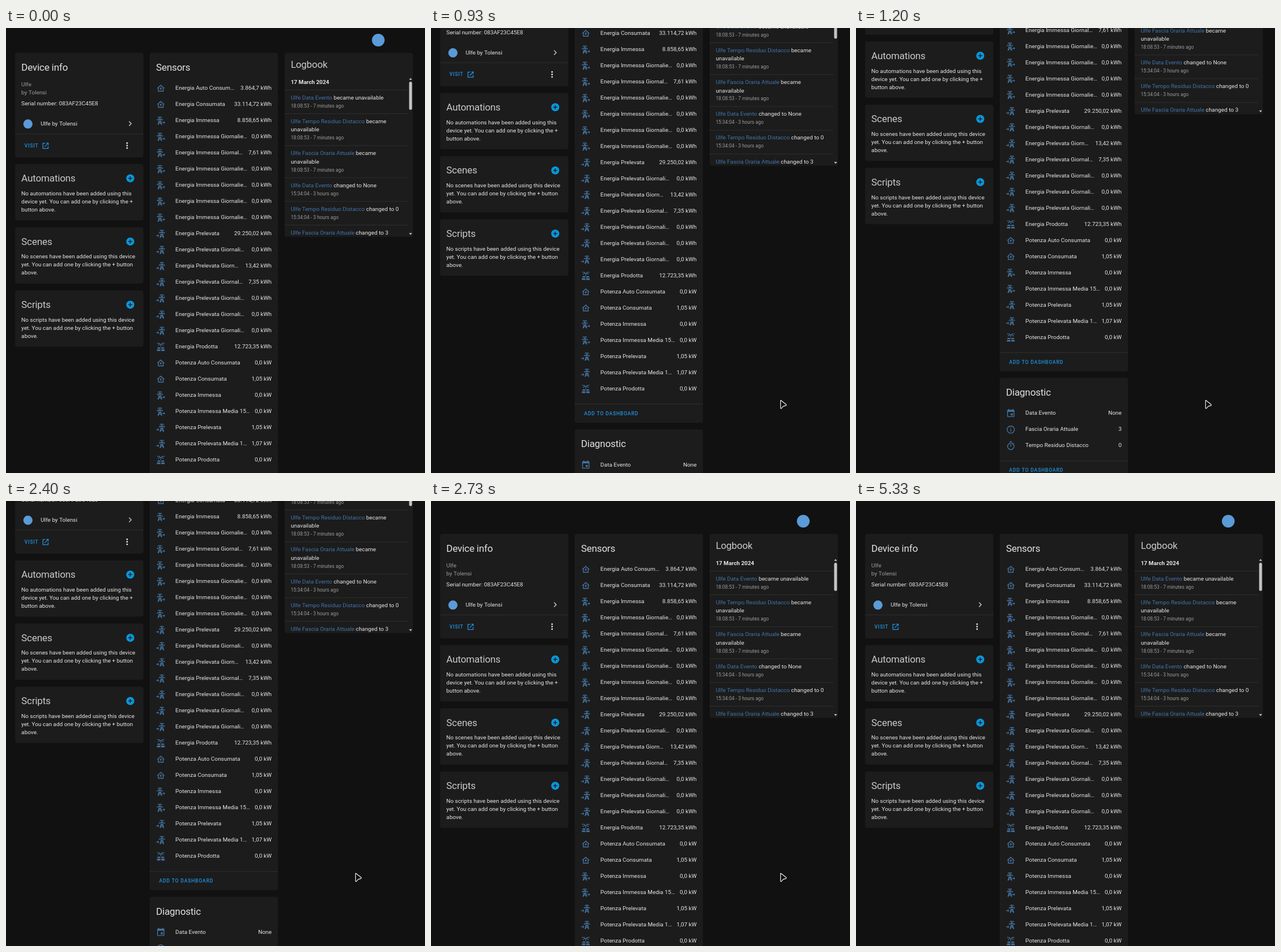
Recreate the animation shown at these times as an HTML page with a canvas. Size 726 by 771 pixels, loop 5740 ms.

```html
<!DOCTYPE html>
<html lang="en">
<head>
<meta charset="utf-8">
<title>Device page</title>
<style>
html, body { margin: 0; width: 100%; height: 100%; overflow: hidden; background: #111; }
canvas { display: block; }
</style>
</head>
<body>
<canvas id="stage" width="726" height="771"></canvas>
<script>
const ctx = document.getElementById('stage').getContext('2d');
const LOOP = 5740, STEP = 200 / 3;
const BODY = '9.8px', ROW = '9.9px';
const C = {
  page: '#111111', card: '#1c1c1c', line: '#333333', text: '#e6e6e6', title: '#e1e1e1',
  soft: '#c9c9c9', dim: '#9b9b9b', icon: '#44739e', link: '#4274aa', action: '#1f93e4',
  add: '#0a96da', brand: '#5a9bd8'
};

const tower = 'M7.4 5 8.4 3H15.6L16.6 5M5 11 6 9H18L19 11M10.7 9 11.5 5.5H12.5L13.3 9' +
  'M10.1 11 7.3 22M13.9 11 16.7 22M10 12.4 15.8 21.2M14 12.4 8.2 21.2';
const shapes = {
  home: new Path2D('M12 3 2 12H5V20H19V12H22ZM12 5.7 17 10.2V18H7V10.2ZM11.3 17V13.6H9L12.7 8V11.4H15Z'),
  solar: new Path2D('M3.3 16H11V13H4ZM13 16H20.7L20 13H13ZM21.1 18H13V22H22ZM2 22H11V18H2.9ZM11 8H13V11H11Z' +
    'M15.8 7.2 17.2 5.8 19.3 7.9 17.9 9.3ZM4.7 7.9 6.8 5.8 8.2 7.2 6.1 9.3ZM3 2H6V4H3ZM18 2H21V4H18Z' +
    'M12 7A5 5 0 0 0 17 2H15A3 3 0 0 1 9 2H7A5 5 0 0 0 12 7Z'),
  calendar: new Path2D('M5 3H6V1H8V3H16V1H18V3H19A2 2 0 0 1 21 5V19A2 2 0 0 1 19 21H5A2 2 0 0 1 3 19V5' +
    'A2 2 0 0 1 5 3ZM5 8V19H19V8ZM12 12H17V17H12Z'),
  info: new Path2D('M21 12A9 9 0 1 1 3 12A9 9 0 1 1 21 12M12 11V17M12 7V9'),
  timer: new Path2D('M20 13.5A8 8 0 1 1 4 13.5A8 8 0 1 1 20 13.5M9 2H15M12 8.5V14.5M18 7.5 19.5 6'),
  tower: new Path2D(tower),
  arrowLine: new Path2D('M0 16.5H4'),
  arrowHead: new Path2D('M4 13 7.5 16.5 4 20Z'),
  cursor: new Path2D('M1 1.5Q.5 .5 1.8 .9L10.6 8Q11.6 9 10.3 9.8L5.8 11 2.6 14.6Q1 15.6 1 14Z')
};

const sensors = [
  ['home', 'Energia Auto Consum…', '3.864,7 kWh'],
  ['home', 'Energia Consumata', '33.114,72 kWh'],
  ['export', 'Energia Immessa', '8.858,65 kWh'],
  ['export', 'Energia Immessa Giornalie…', '0,0 kWh'],
  ['export', 'Energia Immessa Giornal…', '7,61 kWh'],
  ...Array(4).fill(['export', 'Energia Immessa Giornalie…', '0,0 kWh']),
  ['import', 'Energia Prelevata', '29.250,02 kWh'],
  ['import', 'Energia Prelevata Giornali…', '0,0 kWh'],
  ['import', 'Energia Prelevata Giorn…', '13,42 kWh'],
  ['import', 'Energia Prelevata Giornal…', '7,35 kWh'],
  ...Array(3).fill(['import', 'Energia Prelevata Giornali…', '0,0 kWh']),
  ['solar', 'Energia Prodotta', '12.723,35 kWh'],
  ['home', 'Potenza Auto Consumata', '0,0 kW'],
  ['home', 'Potenza Consumata', '1,05 kW'],
  ['export', 'Potenza Immessa', '0,0 kW'],
  ['export', 'Potenza Immessa Media 15…', '0,0 kW'],
  ['import', 'Potenza Prelevata', '1,05 kW'],
  ['import', 'Potenza Prelevata Media 1…', '1,07 kW'],
  ['solar', 'Potenza Prodotta', '0,0 kW']
];
const diagnostics = [
  ['calendar', 'Data Evento', 'None'],
  ['info', 'Fascia Oraria Attuale', '3'],
  ['timer', 'Tempo Residuo Distacco', '0']
];
const recent = '18:08:53 - 7 minutes ago', earlier = '15:34:04 - 3 hours ago';
const log = [
  ['Ulfe Data Evento', 'became unavailable', '', recent],
  ['Ulfe Tempo Residuo Distacco', 'became', 'unavailable', recent],
  ['Ulfe Fascia Oraria Attuale', 'became', 'unavailable', recent],
  ['Ulfe Data Evento', 'changed to None', '', earlier],
  ['Ulfe Tempo Residuo Distacco', 'changed to 0', '', earlier],
  ['Ulfe Fascia Oraria Attuale', 'changed to 3', '', earlier]
];

function text(str, x, y, color = C.text, size = BODY, { weight = 400, spacing = 0, align = 'left' } = {}) {
  ctx.font = `${weight} ${size} Roboto, sans-serif`;
  ctx.letterSpacing = spacing + 'px';
  ctx.textAlign = align;
  ctx.fillStyle = color;
  ctx.fillText(str, x, y);
  return ctx.measureText(str).width;
}
const heading = (str, x, y, color) => text(str, x, y, color, '16.8px', { spacing: -0.2 });
const button = (str, x, y) => text(str, x, y, C.action, '8.5px', { weight: 500, spacing: 0.76 });

function box(x, y, w, h, r, color) {
  ctx.fillStyle = color;
  ctx.beginPath();
  ctx.roundRect(x, y, w, h, r);
  ctx.fill();
}
const card = (x, top, bottom) => box(x, top, 222.3, bottom - top, 4, C.card);

function dot(x, y, r, color) {
  ctx.fillStyle = color;
  ctx.beginPath();
  ctx.arc(x, y, r, 0, Math.PI * 2);
  ctx.fill();
}

function rule(x, y, w) {
  ctx.fillStyle = C.line;
  ctx.fillRect(x, y - 0.4, w, 0.8);
}

function stroke(color, width, ...points) {
  ctx.strokeStyle = color;
  ctx.lineWidth = width;
  ctx.beginPath();
  points.forEach(([x, y]) => ctx.lineTo(x, y));
  ctx.stroke();
}

function triangle(x, y, dir) {
  ctx.fillStyle = '#c4c4c4';
  ctx.beginPath();
  ctx.moveTo(x - 2.6, y + 1.4 * dir);
  ctx.lineTo(x + 2.6, y + 1.4 * dir);
  ctx.lineTo(x, y - 1.8 * dir);
  ctx.fill();
}

function icon(kind, cx, cy) {
  ctx.save();
  ctx.translate(cx - 8.4, cy - 8.4);
  ctx.scale(0.7, 0.7);
  ctx.fillStyle = ctx.strokeStyle = C.icon;
  ctx.lineWidth = 2;
  if (kind === 'export' || kind === 'import') {
    const out = kind === 'export';
    ctx.translate(out ? -2.3 : 2.7, 0);
    ctx.lineWidth = 1.8;
    ctx.stroke(shapes.tower);
    ctx.translate(out ? 17.5 : -2.2, 0);
    ctx.stroke(shapes.arrowLine);
    ctx.fill(shapes.arrowHead);
  } else if (kind === 'info' || kind === 'timer') {
    ctx.stroke(shapes[kind]);
  } else {
    ctx.fill(shapes[kind], 'evenodd');
  }
  ctx.restore();
}

function rows(list, y) {
  list.forEach(([kind, label, value], i) => {
    const mid = y + i * 28;
    icon(kind, 268.2, mid + 0.6);
    text(label, 293.6, mid + 3.1, C.text, ROW);
    text(value, 460.3, mid + 3.1, C.text, ROW, { align: 'right' });
  });
}

function deviceCard() {
  card(15.7, 43, 224);
  heading('Device info', 26.6, 74, C.title);
  text('Ulfe', 26.6, 100.5, C.dim);
  text('by Tolensi', 26.6, 114.5, C.dim);
  text('Serial number: 083AF23C45E8', 26.6, 134);
  dot(38, 166.3, 8, C.brand);
  text('Ulfe by Tolensi', 60, 169);
  stroke('#c8c8c8', 1.4, [213.2, 161.8], [217, 165.7], [213.2, 169.6]);
  rule(15.7, 183.3, 222.3);
  button('VISIT', 32, 206.6);
  stroke(C.action, 1.3, [68, 199.6], [64, 199.6], [64, 208.6], [73, 208.6], [73, 204.5]);
  stroke(C.action, 1.3, [67, 205.6], [73, 199.6]);
  stroke(C.action, 1.3, [70, 199.4], [73.2, 199.4], [73.2, 202.8]);
  for (const dy of [-4.3, 0, 4.3]) dot(209.8, 203.7 + dy, 1.4, C.text);
}

function emptyCard(top, title, kind, lines) {
  card(15.7, top, top + 97.5);
  heading(title, 26.6, top + 30.4, C.soft);
  dot(215.3, top + 24.7, 7, C.add);
  stroke(C.card, 1.4, [211.8, top + 24.7], [218.8, top + 24.7]);
  stroke(C.card, 1.4, [215.3, top + 21.2], [215.3, top + 28.2]);
  lines.forEach((line, i) => text(line, 26.6, top + 54.2 + i * 14));
}

function listCard(top, bottom, title, list) {
  card(249, top, bottom);
  heading(title, 260, top + 31, C.title);
  rows(list, top + 61);
  rule(249, bottom - 32.4, 222.3);
  button('ADD TO DASHBOARD', 265.3, bottom - 13.4);
}

function logbook() {
  card(482.7, 43, 361.8);
  heading('Logbook', 493.4, 68.6, C.soft);
  text('17 March 2024', 493.4, 97.4, C.text, BODY, { weight: 700 });
  ctx.save();
  ctx.beginPath();
  ctx.rect(482, 80, 224, 280.3);
  ctx.clip();
  let y = 107.5;
  for (const [name, action, wrapped, when] of log) {
    rule(482.7, y, 214.6);
    const w = text(name + ' ', 493.4, y + 16.3, C.link);
    text(action, 493.4 + w, y + 16.3);
    if (wrapped) text(wrapped, 493.4, y + 30.8);
    text(when, 493.4, y + (wrapped ? 44.7 : 30.3), C.dim, '8.4px');
    y += wrapped ? 55.3 : 41.1;
  }
  ctx.restore();
  triangle(701, 88.4, 1);
  box(698.5, 93, 5, 48.8, 2.5, '#c4c4c4');
  triangle(701, 356.6, -1);
}

function page(scroll) {
  ctx.fillStyle = C.page;
  ctx.fillRect(0, 0, 726, 771);
  ctx.save();
  ctx.translate(0, -scroll);
  dot(645, 21, 11, C.brand);
  deviceCard();
  emptyCard(235.7, 'Automations', 'automations',
    ['No automations have been added using this', 'device yet. You can add one by clicking the +', 'button above.']);
  emptyCard(345.2, 'Scenes', 'scenes',
    ['No scenes have been added using this device', 'yet. You can add one by clicking the + button', 'above.']);
  emptyCard(454.7, 'Scripts', 'scripts',
    ['No scripts have been added using this device', 'yet. You can add one by clicking the + button', 'above.']);
  listCard(43, 807.3, 'Sensors', sensors);
  listCard(818.6, 995, 'Diagnostic', diagnostics);
  logbook();
  ctx.restore();
}

const progress = (n, from, steps) => Math.min(1, Math.max(0, (n - from) / steps));
const easeOut = (u, power) => 1 - (1 - u) ** power;

function scrollAt(n) {
  const down = easeOut(progress(n, 11, 7), 1.55);
  const up = easeOut(progress(n, 35, 6), 2.37);
  return 212.4 * down - 226.4 * up;
}

function drawCursor(n) {
  if (n < 4 || n >= 80) return;
  const enter = (1 - progress(n, 3, 6)) ** 2;
  const leave = progress(n, 71, 8);
  ctx.save();
  ctx.translate(604.7 + 158 * enter - 505 * leave ** 2.06, 644.3 + 166 * enter + 102 * leave ** 2.4);
  ctx.fillStyle = '#0a0a0a';
  ctx.strokeStyle = '#f0f0f0';
  ctx.lineWidth = 1.2;
  ctx.fill(shapes.cursor);
  ctx.stroke(shapes.cursor);
  ctx.restore();
}

// The motion advances in fifteenths of a second.
function frame() {
  const n = Math.floor((performance.now() % LOOP + 3.4) / STEP);
  page(scrollAt(n));
  drawCursor(n);
  requestAnimationFrame(frame);
}
frame();
</script>
</body>
</html>
```
